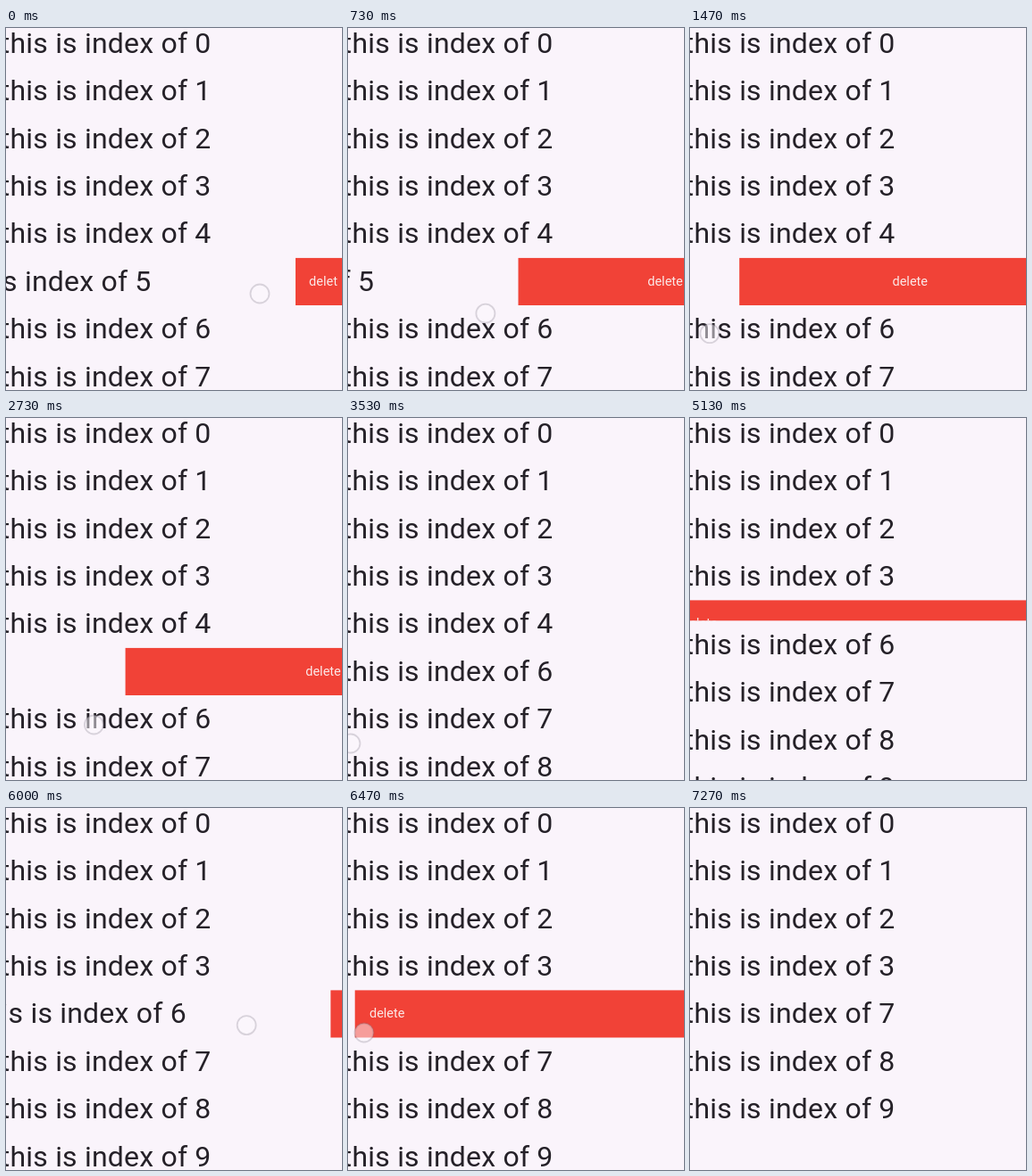
Write an HTML page with a canvas that moves like this. It is 376 by 406 pixels and loops after 7.87 s.

```html
<!DOCTYPE html>
<html lang="en">
<head>
<meta charset="utf-8">
<title>Swipe to delete</title>
<style>
  html, body { margin: 0; width: 100%; height: 100%; overflow: hidden; background: #faf4fb; }
  canvas { display: block; }
</style>
</head>
<body>
<canvas id="stage" width="376" height="406"></canvas>
<script>
const ctx = document.getElementById('stage').getContext('2d');
const LOOP = 7870, STEP = 200 / 3;
const W = 376, H = 406, RIGHT = 391, PITCH = 53.45, TOP = -9.6;
const FULL = 344, OUT = 416, BUTTON = 72;

const ramp = (v, a, b) => Math.min(1, Math.max(0, (v - a) / (b - a)));
const smooth = u => u * u * (3 - 2 * u);
const mix = (a, b, u) => a + (b - a) * u;
const fling = (t, start) => smooth(ramp(t, start, start + 350));

// A slow drag that is pulled back once before the release.
const scrub = t => ramp(t, 0, 1515) - .405 * Math.sin(Math.PI * ramp(t, 2450, 3270)) ** 2;

// travel: finger progress 0 to 1, lag: ms the row trails the finger, out: release time.
const swipes = [
  { row: 5, press: 0, out: 3270, lag: 0, travel: scrub, pull: 67,
    x: [284, 14], y: [298, 344], drift: [-11, 21] },
  { row: 4, press: 3990, out: 4940, lag: 10, travel: t => fling(t, 4453), pull: 0,
    x: [356, -14], y: [285, 267], drift: [0, 0] },
  { row: 6, press: 5590, out: 6410, lag: 49, travel: t => fling(t, 5890), pull: 0,
    x: [346, 18], y: [241, 252], drift: [0, 0] }
];

function text(str, x, y, size, color, spacing) {
  ctx.font = `${size}px Roboto, sans-serif`;
  ctx.letterSpacing = spacing + 'px';
  ctx.fillStyle = color;
  ctx.fillText(str, x, y);
}

function drawButton(top, height, drag) {
  const left = RIGHT - drag;
  ctx.fillStyle = '#f14237';
  ctx.fillRect(left, top, drag, height);

  // The label shows the letters that fit, and slides left on a full swipe.
  const label = 'delete'.slice(0, Math.max(0, Math.floor((drag - 30) / 6.8)));
  const center = mix(RIGHT - BUTTON / 2, left + BUTTON / 2, ramp(drag, 330, FULL));
  ctx.textAlign = 'center';
  text(label, center, top + 31.2, 14.5, '#fbe9e8', 0);
  ctx.textAlign = 'left';
}

function drawRow(n, top, t) {
  const s = swipes.find(s => s.row === n && t >= s.press);
  let drag = 0, height = PITCH;
  if (s) {
    drag = mix(s.pull, FULL, s.travel(t - s.lag));
    drag = mix(drag, OUT, ramp(t, s.out, s.out + 110));
    height *= 1 - ramp(t, s.out + 100, s.out + 260);
  }
  ctx.save();
  ctx.beginPath();
  ctx.rect(0, top, W, height);
  ctx.clip();
  text(`this is index of ${n}`, -6.2 - drag, top + 37.2, 32, '#252128', .2);
  if (drag > 0) drawButton(top, height, drag);
  ctx.restore();
  return height;
}

function drawTouch(s, t) {
  if (t < s.press || t > s.out + 385) return;
  const u = s.travel(t), rise = Math.max(u, ramp(t, s.press, s.press + 1515));
  const after = ramp(t, s.out - 70, s.out + 130);
  ctx.beginPath();
  ctx.arc(mix(...s.x, u) + s.drift[0] * after,
          mix(...s.y, s.row === 5 ? rise : u) + s.drift[1] * after, 10.5, 0, 2 * Math.PI);
  ctx.fillStyle = 'rgba(252,248,253,.5)';
  ctx.fill();
  ctx.strokeStyle = 'rgba(130,122,136,.28)';
  ctx.lineWidth = 1.8;
  ctx.stroke();
}

let begin;
function draw(now) {
  begin ??= now;
  const frame = Math.floor(((now - begin) % LOOP + 4) / STEP);
  const t = Math.round(frame * STEP / 10) * 10;
  ctx.fillStyle = '#faf4fb';
  ctx.fillRect(0, 0, W, H);
  let top = TOP;
  for (let n = 0; n < 10; n++) top += drawRow(n, top, t);
  swipes.forEach(s => drawTouch(s, t));
  requestAnimationFrame(draw);
}
requestAnimationFrame(draw);
</script>
</body>
</html>
```
